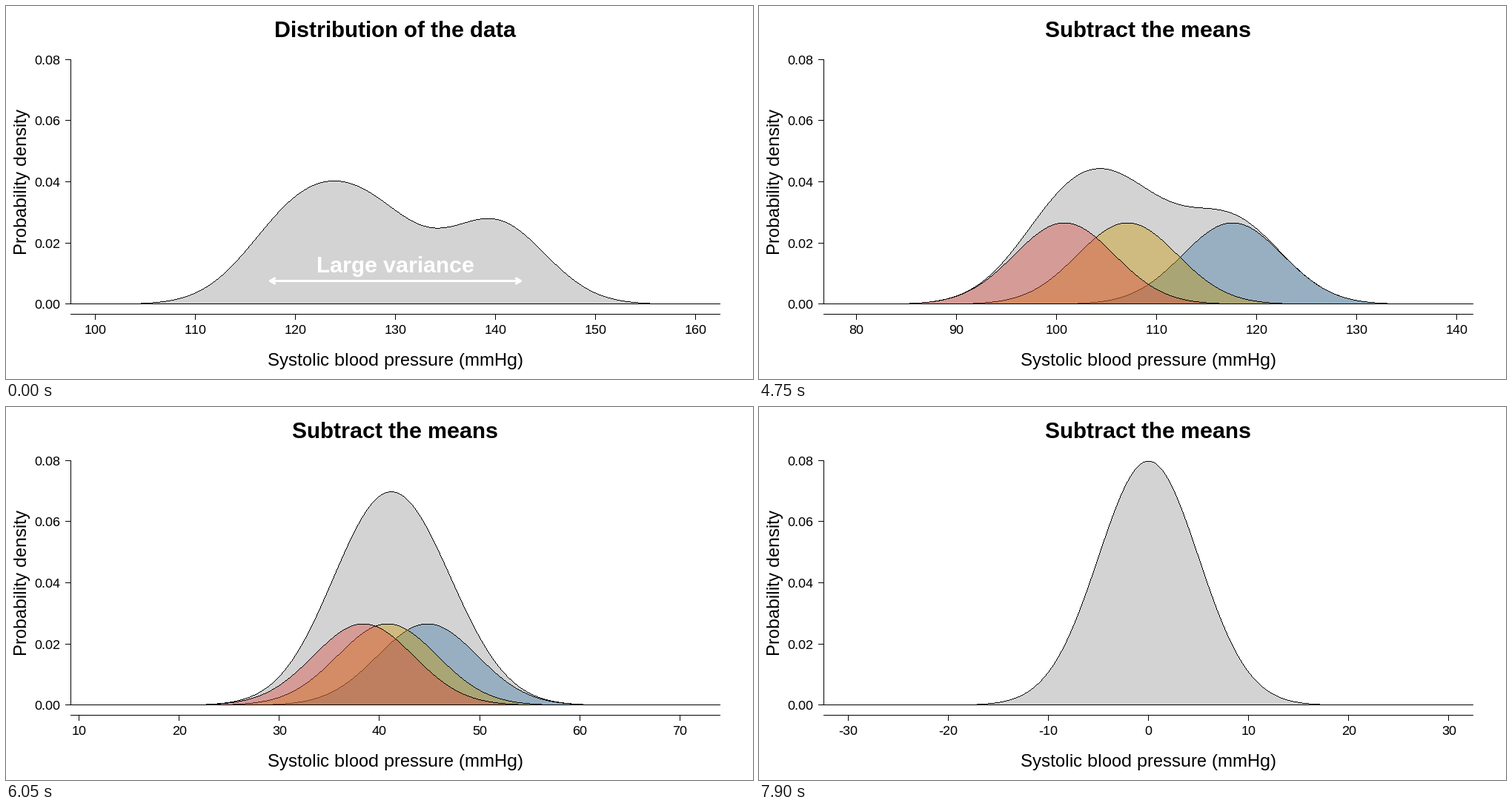
Animation, 1008 px wide and 504 px high, one loop 8000 ms. Source, as a matplotlib script:

```python
import numpy as np
import matplotlib.pyplot as plt
from matplotlib.animation import FuncAnimation

# Coordinates are pixels with y pointing down; at 72 dpi one point is one pixel.
W, H, STEP, LOOP = 1008, 504, 50, 8000
LINE = 14.4  # height of one margin line
LEFT, RIGHT = 6.1 * LINE, W - 3.1 * LINE
TOP, BOTTOM = 4.1 * LINE, H - 6.1 * LINE
TICK = LINE / 2
PER_X = (RIGHT - LEFT) / 64.8
PER_Y = (BOTTOM - TOP) / 0.0864
MID = (LEFT + RIGHT) / 2
BASE = BOTTOM - 0.0032 * PER_Y
SD, CENTER = 5, 130
GROUPS = [(140, (63, 121, 166)), (127.5, (201, 151, 4)), (120, (218, 71, 63))]
FILL = 0.4

plt.rcParams.update({
    "font.family": "Liberation Sans",
    "text.hinting": "native",
    "text.hinting_factor": 1,
    "text.kerning_factor": 6,
})
fig = plt.figure(figsize=(W / 72, H / 72), dpi=72, facecolor="white")
ax = fig.add_axes([0, 0, 1, 1])
ax.set_xlim(0, W)
ax.set_ylim(H, 0)
ax.axis("off")

edges = np.arange(int(LEFT), int(RIGHT) + 2)


def grid(v):
    """Centre of the pixel that holds v."""
    return np.floor(v) + 0.5


def line(xs, ys, **kw):
    style = dict(color="black", lw=1, solid_capstyle="projecting", snap=False, zorder=5)
    return ax.plot(grid(np.array(xs)), grid(np.array(ys)), **{**style, **kw})[0]


def label(x, y, s, size, ha="center", **kw):
    return ax.text(x, y, s, fontsize=size, ha=ha, va="baseline", zorder=6, **kw)


def density(mean, center):
    """Heights in pixels at the edges and the middles of the columns."""
    cols = np.stack([edges, edges + 0.5])
    z = (center + (cols - MID) / PER_X - mean) / SD
    return PER_Y / (SD * np.sqrt(2 * np.pi)) / len(GROUPS) * np.exp(-z * z / 2)


def stairs(top, bottom):
    xs = np.repeat(edges, 2)[1:-1]
    upper = np.column_stack([xs, np.repeat(top, 2)])
    lower = np.column_stack([xs, np.repeat(bottom, 2)])
    return np.vstack([upper, lower[::-1]])


class Hill:
    """Filled curve with a hard one-pixel outline."""

    def __init__(self, rgb, zorder):
        self.rgb = np.array(rgb) / 255
        self.body, self.rim = (
            ax.fill([0, 1, 1], [0, 0, 1], lw=0, snap=False, zorder=zorder + d)[0]
            for d in (0, 0.05))

    def shape(self, heights):
        at_edge, at_mid = BASE - heights
        a, b = at_edge[:-1], at_edge[1:]
        top, low = np.round(np.minimum(a, b)), np.round(np.maximum(a, b))
        top = np.where(top == low, np.floor(at_mid[:-1]), top)
        low = np.maximum(low, top + 1)
        low = np.where(low - top < 2, top + 1, low)
        self.body.set_xy(stairs(top, np.full_like(top, np.floor(BASE))))
        self.rim.set_xy(stairs(top, low))

    def fade(self, fill, rim):
        self.body.set_facecolor((*self.rgb, fill))
        self.rim.set_facecolor((0, 0, 0, rim))
        self.body.set_visible(fill > 0)
        self.rim.set_visible(rim > 0)


total = Hill((211, 211, 211), 1)
total.fade(1, 1)
parts = [Hill(rgb, 2 + 0.1 * i) for i, (_, rgb) in enumerate(GROUPS)]

# Fixed axes
line([LEFT, RIGHT], [BASE, BASE])
line([LEFT, RIGHT], [BOTTOM, BOTTOM])
line([LEFT, LEFT], [BASE - 0.08 * PER_Y, BASE])
for v in np.arange(5) * 0.02:
    y = BASE - PER_Y * v
    line([LEFT - TICK, LEFT], [y, y])
    label(73.5, np.floor(y) + 7, f"{v:.2f}", 18, ha="right")
label(MID - 0.5, 486, "Systolic blood pressure (mmHg)", 24)
ax.text(28, 237, "Probability density", fontsize=24, rotation=90,
        rotation_mode="anchor", ha="center", va="baseline")

title = label(MID - 0.5, 42, "", 30, weight="bold")
ticks = [(line([0, 0], [BOTTOM, BOTTOM + TICK]), label(0, 443, "", 18))
         for _ in range(7)]

# Variance note with a double-headed arrow
note = [label(MID, 360, "Large variance", 30, weight="bold", color="white")]
x0, x1 = grid(MID - 12.5 * PER_X), grid(MID + 12.5 * PER_X)
ya = grid(BASE - 0.0075 * PER_Y)
white = dict(color="white", lw=3, solid_capstyle="round", solid_joinstyle="round",
             snap=False, zorder=5)
note += ax.plot([x0, x1], [ya, ya], **white)
for tip, d in ((x0, 6.2), (x1, -6.2)):
    note += ax.plot([tip + d, tip, tip + d], [ya - 3.6, ya, ya + 3.6], **white)


def group_level(t):
    if t < 500:
        return 0.0
    if t < 7750:
        return min(1.0, (t - 450) / 950)
    return max(0.0, 1 - (t - 7700) / 200)


def heading(t):
    if t < 1400:
        return "Distribution of the data"
    if t < 4400:
        return "Underlying distribution of the groups"
    return "Subtract the means"


def draw(i):
    t = i * STEP
    scale = 1 - float(np.clip((t - 4350) / 2500, 0, 1))
    center = CENTER * scale
    level = group_level(t)

    title.set_text(heading(t))
    curves = [density(mean * scale, center) for mean, _ in GROUPS]
    total.shape(sum(curves))
    for part, curve in zip(parts, curves):
        part.shape(curve)
        part.fade(FILL * level, level)

    note_alpha = 1 - level if t < 1400 else 0
    for artist in note:
        artist.set_alpha(note_alpha)
        artist.set_visible(note_alpha > 0)

    first = int(np.ceil((center - 32.4) / 10)) * 10
    for k, (mark, text) in enumerate(ticks):
        v = first + 10 * k
        x = MID + PER_X * (v - center)
        mark.set_xdata([grid(x)] * 2)
        text.set_x(x)
        text.set_text(str(v))
        mark.set_visible(x <= RIGHT)
        text.set_visible(x <= RIGHT)
    return []


anim = FuncAnimation(fig, draw, frames=LOOP // STEP, interval=STEP,
                     init_func=lambda: draw(0), repeat=True, repeat_delay=0,
                     blit=False)
plt.show()
```
